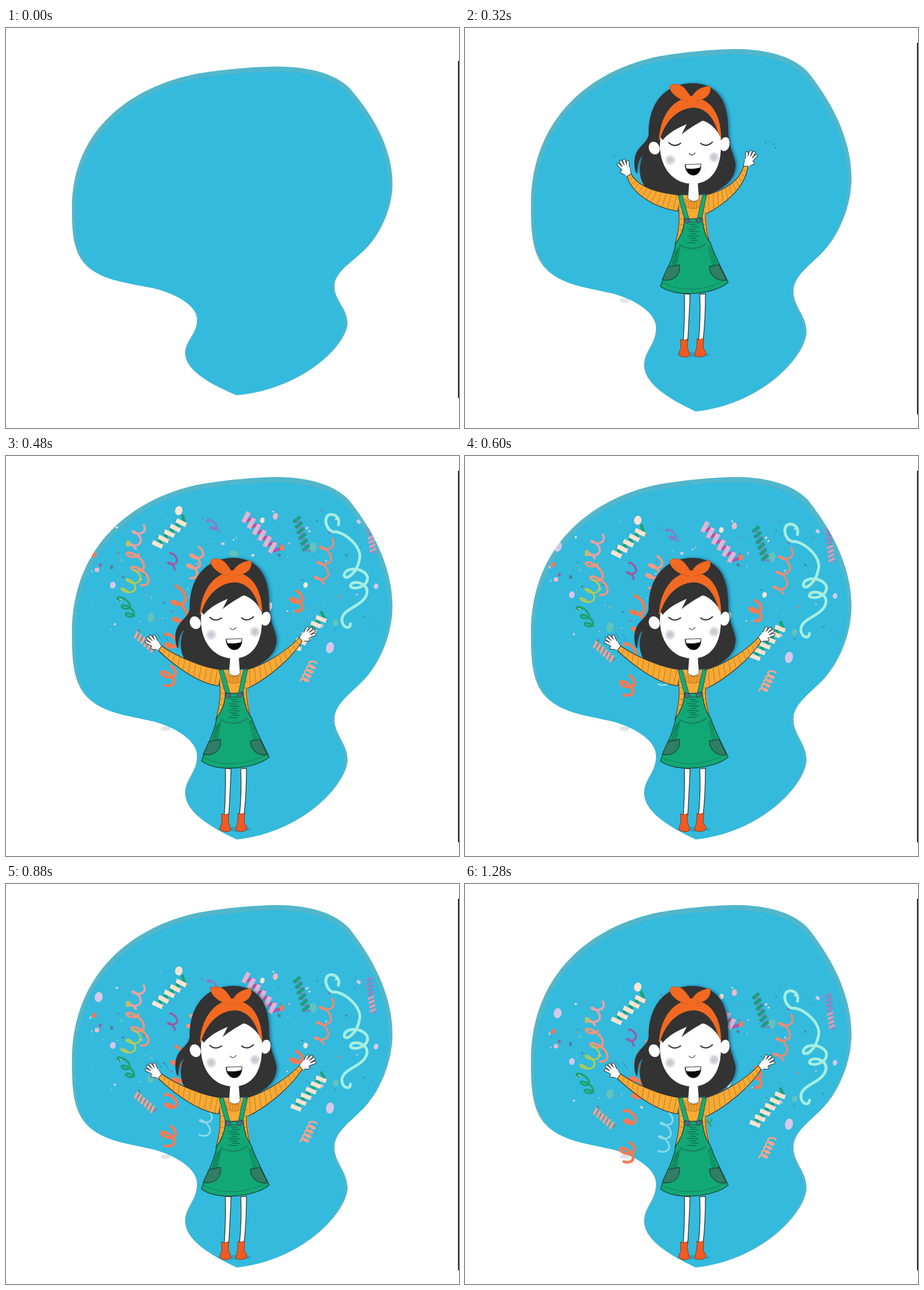
Animation of 797x703 px, one loop 1.36 s. Source, as an HTML page with a canvas:

```html
<!DOCTYPE html>
<html lang="en">
<head>
<meta charset="utf-8">
<title>Celebration</title>
<style>
  html, body { margin: 0; width: 100%; height: 100%; overflow: hidden; background: #fff; }
  canvas { display: block; }
</style>
</head>
<body>
<canvas id="stage" width="797" height="703"></canvas>
<script>
const ctx = document.getElementById('stage').getContext('2d');
const LOOP = 1360, STEP = 40, TAU = Math.PI * 2;
const INK = '#2b2b2b', ORANGE = '#f47b55', CREAM = '#fbe3d3', GREEN = '#1fa06f',
      LILAC = '#d6c8ea', TEAL = '#62c3bd', MINT = '#a5eee0', PINK = '#efb9c8';

const clamp01 = v => Math.max(0, Math.min(1, v));
const mix = (a, b, k) => a + (b - a) * k;

function shape(d, fill, stroke, width = 1) {
  const path = new Path2D(d);
  if (fill) { ctx.fillStyle = fill; ctx.fill(path); }
  if (stroke) { ctx.strokeStyle = stroke; ctx.lineWidth = width; ctx.stroke(path); }
}
function oval(x, y, rx, ry, fill, stroke, tilt = 0) {
  ctx.beginPath();
  ctx.ellipse(x, y, rx, ry, tilt, 0, TAU);
  ctx.fillStyle = fill;
  ctx.fill();
  if (stroke) { ctx.strokeStyle = stroke; ctx.lineWidth = 1; ctx.stroke(); }
}
function line(x1, y1, x2, y2, color, width = 1) {
  ctx.beginPath();
  ctx.moveTo(x1, y1);
  ctx.lineTo(x2, y2);
  ctx.strokeStyle = color;
  ctx.lineWidth = width;
  ctx.stroke();
}

// ---- Backdrop ----
const blob = new Path2D(`M406 674 C350 648 315 622 315 592 C316 566 336 556 336 527
  C336 500 300 478 262 467 C215 456 170 452 142 423 C117 396 116 355 116 310
  C117 155 225 75 335 51 C385 42 440 37 480 37 C540 38 580 53 603 77
  C640 123 680 190 680 264 C680 310 660 360 633 390 C607 418 578 435 578 463
  C578 490 601 505 601 535 C598 580 520 662 406 674Z`);

// Confetti may leave the blob only at its lower side.
const confettiArea = new Path2D(blob);
confettiArea.rect(0, 400, 797, 303);

function backdrop(t) {
  const grow = mix(0.907, 1, clamp01(t / 120));
  ctx.save();
  ctx.translate(0, 352.5 + (1 - grow) * 16);
  ctx.scale(1, grow);
  ctx.translate(0, -352.5);
  ctx.fillStyle = '#000';
  ctx.fillRect(795.4, 26, 1.6, 653);
  if (t >= 120) oval(281, 479, 9, 4, '#dfe5e7');
  ctx.fillStyle = '#52b6ca';
  ctx.fill(blob);
  ctx.clip(blob);
  ctx.translate(400, 640);
  ctx.scale(0.978, 0.985);
  ctx.translate(-400, -640);
  ctx.fillStyle = '#33badd';
  ctx.fill(blob);
  ctx.restore();
}

// ---- Confetti ----
function curl(x1, y1, x2, y2, loops, r, color, width = 4, phase = 0) {
  ctx.beginPath();
  for (let i = 0; i <= 100; i++) {
    const s = i / 100, a = phase + s * loops * TAU;
    ctx.lineTo(mix(x1, x2, s) + r * Math.cos(a), mix(y1, y2, s) + r * 0.7 * Math.sin(a + 0.5));
  }
  ctx.strokeStyle = color;
  ctx.lineWidth = width;
  ctx.stroke();
}
function helix(x1, y1, x2, y2, turns, size, front, back) {
  const length = Math.hypot(x2 - x1, y2 - y1), pitch = length / turns;
  ctx.save();
  ctx.translate(x1, y1);
  ctx.rotate(Math.atan2(y2 - y1, x2 - x1));
  ctx.lineCap = 'butt';
  for (let i = 0; i < turns; i++) {
    const x = i * pitch;
    line(x + pitch * 0.4, size / 2, x + pitch, -size / 2, back, pitch * 0.4);
    line(x, -size / 2, x + pitch * 0.5, size / 2, front, pitch * 0.55);
  }
  ctx.restore();
}

let seed = 11;
const random = () => (seed = seed * 16807 % 2147483647) / 2147483647;
const speckColors = [ORANGE, LILAC, CREAM, TEAL, '#2c8fb2', '#a95a9f', PINK, '#507f9b'];
const specks = Array.from({ length: 120 }, (_, i) => ({
  x: 142 + random() * 518, y: 180 + random() * 215,
  size: 1.2 + random() * random() * 4.5, tilt: random() * 3,
  color: speckColors[i % speckColors.length]
}));
const dots = [
  [304, 181, 6.5, 8, CREAM], [163, 227, 7, 9, LILAC], [188, 312, 5, 6, LILAC],
  [255, 369, 6, 9, TEAL], [570, 422, 7, 10, LILAC], [580, 378, 5, 6, TEAL],
  [651, 314, 4, 5, LILAC], [540, 246, 6.5, 9, TEAL], [474, 191, 4.5, 6, PINK],
  [451, 198, 4, 5, CREAM], [527, 312, 4, 5, CREAM], [464, 350, 4, 8, '#fff'],
  [401, 257, 8, 6, TEAL], [160, 285, 4, 4, PINK]
];

function confetti(t) {
  ctx.save();
  ctx.clip(confettiArea);
  ctx.globalAlpha = clamp01((t - 360) / 80);
  ctx.translate(0, Math.min(0, (t - 1079) * 0.142));
  ctx.lineCap = ctx.lineJoin = 'round';
  for (const s of specks) {
    ctx.save();
    ctx.translate(s.x, s.y);
    ctx.rotate(s.tilt);
    ctx.fillStyle = s.color;
    ctx.fillRect(-s.size / 2, -s.size / 2, s.size, s.size * 1.3);
    ctx.restore();
  }
  for (const [x, y, rx, ry, color] of dots) oval(x, y, rx, ry, color, null, 0.2);

  helix(264, 243, 316, 195, 5, 18, CREAM, GREEN);
  helix(508, 424, 561, 364, 6, 18, CREAM, GREEN);
  helix(420, 190, 476, 254, 6, 19, '#e3b3d3', '#a958a8');
  helix(511, 194, 530, 254, 6, 14, '#249b80', '#6b8bc6');
  helix(639, 193, 642, 226, 4, 11, '#8f8ac6', '#5c92c0');
  helix(642, 226, 646, 256, 4, 11, '#d6a0b4', '#8f8ac6');
  helix(228, 398, 262, 428, 6, 13, '#f4a48e', '#6f90a5');
  curl(524, 482, 541, 448, 4.5, 6, '#f7a58b', 3, 3);

  curl(236, 208, 222, 250, 2, 9, '#e6a3a5', 4, 5.5);
  curl(222, 250, 240, 305, 2.2, 13, '#f1947c', 4, 0.5);
  curl(230, 292, 210, 328, 2.2, 10, '#b5cb51', 3, 4);
  curl(204, 335, 222, 370, 2.5, 9, GREEN, 3.5, 2);
  curl(296, 258, 290, 283, 1.5, 7, '#9e58a2', 3.5, 3);
  curl(360, 198, 369, 218, 1.6, 7, '#8a78c4', 3, 2);
  curl(338, 250, 325, 294, 2.5, 10, '#f49a82', 4, 4.8);
  curl(302, 322, 308, 382, 2, 13, ORANGE, 5, 4.5);
  curl(290, 402, 291, 424, 1.3, 10, ORANGE, 5, 3);
  curl(287, 460, 283, 482, 1.5, 12, ORANGE, 5, 5);
  curl(566, 232, 552, 312, 3, 11, '#ee8b72', 3.5, 5.5);
  curl(511, 328, 511, 352, 1.5, 10, ORANGE, 5, 4.7);
  curl(356, 407, 348, 468, 2.6, 10, '#8fd8e8', 3, 5);
  curl(428, 412, 426, 424, 1, 6, '#2aa782', 3);
  shape(`M585 206 C588 192 577 185 567 189 C556 198 568 222 580 218
    C600 222 626 245 622 266 C618 292 596 306 595 294 C598 278 632 282 636 298
    C638 314 612 322 606 314 C606 302 638 306 635 326 C630 350 590 352 591 374
    C592 388 606 390 606 380`, null, MINT, 5);
  ctx.fillStyle = ORANGE;
  ctx.fillRect(482, 241, 7, 10);
  ctx.fillRect(152, 255, 7, 8);
  ctx.fillStyle = '#c4bd61';
  ctx.fillRect(211, 234, 7, 10);
  ctx.restore();
}

// ---- Girl ----
// Each arm: upper edge from shoulder to wrist, then lower edge back to the body.
const arms = [
  { closed: [380, 376, 345, 372, 307, 365, 292, 338, 285, 343, 295, 375, 335, 398, 374, 404],
    open: [380, 376, 345, 372, 300, 352, 274, 334, 268, 342, 300, 372, 340, 400, 374, 404],
    angles: [-2.05, -2.4], side: 1 },
  { closed: [422, 376, 455, 368, 482, 352, 490, 325, 498, 325, 492, 365, 455, 393, 422, 410],
    open: [422, 376, 452, 369, 495, 342, 516, 319, 521, 326, 500, 358, 460, 392, 422, 410],
    angles: [-1.1, -0.65], side: -1 }
];
const bezier = (p, i, s) => [0, 1].map(n => {
  const q = 1 - s, at = j => p[i + j * 2 + n];
  return q * q * q * at(0) + 3 * q * q * s * at(1) + 3 * q * s * s * at(2) + s * s * s * at(3);
});

function hand(x, y, angle, side) {
  ctx.save();
  ctx.translate(x, y);
  ctx.rotate(angle);
  ctx.scale(1, side);
  ctx.lineCap = 'round';
  const fingers = [[6, 11, -9], [15, 25, -8], [16, 28, -2], [16, 27, 4], [14, 22, 9]];
  for (const [color, width] of [[INK, 5.4], ['#fff', 3.4]]) {
    for (const [from, to, dy] of fingers) line(from, dy * 0.6, to, dy, color, width);
  }
  shape('M-1 -4 L8 -7 Q19 -8 19 0 Q18 7 9 7 L-1 4Z', '#fff');
  line(-1, 4, 9, 7, INK, 0.8);
  ctx.restore();
}

function drawArm({ closed, open, angles, side }, k) {
  const p = closed.map((v, i) => mix(v, open[i], k));
  hand((p[6] + p[8]) / 2, (p[7] + p[9]) / 2, mix(...angles, k), side);
  shape(`M${p.slice(0, 2)} C${p.slice(2, 8)} L${p.slice(8, 10)} C${p.slice(10)}Z`, '#f8aa34', INK, 1.1);
  for (let s = 0.07; s < 0.98; s += 0.085) {
    line(...bezier(p, 0, s), ...bezier(p, 8, 1 - s), '#b9782a', 1);
  }
}

function cheek(x, y) {
  const glow = ctx.createRadialGradient(x, y, 1, x, y, 12);
  glow.addColorStop(0, '#c3c4cc');
  glow.addColorStop(0.5, '#d9dadf');
  glow.addColorStop(1, '#ffffff00');
  oval(x, y, 12, 12, glow);
}

function head() {
  ctx.save();
  ctx.shadowColor = 'rgba(15,75,110,.6)';
  ctx.shadowBlur = 5;
  ctx.shadowOffsetX = 3;
  shape(`M400 179 C350 180 322 215 323 270 C318 290 297 290 298 322 C299 333 301 337 303 338
    C303 322 306 312 313 306 C302 330 308 362 330 371 C360 376 400 376 430 374
    C460 362 477 345 476 320 C472 300 463 290 463 260 C463 215 448 180 400 179Z`, '#333');
  ctx.restore();
  oval(333, 293, 10, 12, '#fff', INK, -0.4);
  oval(457, 286, 9, 13, '#fff', INK, 0.2);
  shape(`M344 274 C338 318 360 356 402 356 C440 354 453 320 450 275
    C445 262 430 247 418 245 C405 252 395 258 381 269 L390 251 C374 258 358 266 348 279Z`, '#fff');
  shape(`M341 278 C345 225 375 203 400 204 C430 205 450 230 451 276 L446 268
    C438 238 422 222 402 222 C375 223 352 245 343 278Z`, '#f26a21');
  shape('M398 212 C380 211 362 198 360 186 C363 177 380 180 387 189 C393 196 398 203 398 212Z', '#f26a21', '#cf5518');
  shape('M397 211 C400 195 412 186 431 184 C434 198 424 210 397 211Z', '#f26a21', '#cf5518');
  oval(398, 207, 8, 6, '#f26a21');
  cheek(361, 314);
  cheek(438, 309);
  shape('M358 283 Q368 293 380 284 M414 284 Q424 293 436 282', null, INK, 2);
  shape('M394 302 Q399 309 405 301', null, INK, 1.2);
  shape('M387 322 L415 321 C417 347 388 347 387 322Z', '#050505', INK);
  shape('M388 322 L415 321 Q415 327 412 328 Q400 331 389 329Z', '#fff', INK, 0.7);
}

function outfit() {
  shape('M376 376 C378 410 376 440 369 464 L432 464 C424 430 424 405 424 376Z', '#f8aa34');
  shape('M376 400 C378 420 376 440 369 464 M432 464 C424 440 423 420 423 408', null, INK);
  for (let y = 396; y < 460; y += 10) {
    line(375, y, 386, y + 3, '#b9782a');
    line(416, y + 3, 425, y, '#b9782a');
  }
  shape('M383 380 Q402 396 421 380 L420 392 Q402 407 385 393Z', '#f39c2b', '#b9782a');
  for (let x = 388; x < 420; x += 5) line(x, 387, x + (x - 402) * -0.1, 398, '#b9782a', 0.8);
  shape('M394 354 L410 354 L412 382 Q403 391 392 382Z', '#fff');
  shape('M394 355 L392 382 Q403 391 412 382 L410 355', null, INK, 0.8);
  shape('M375 377 L382 375 L394 417 L387 421Z M418 376 L425 376 L416 420 L409 416Z', '#17aa72', '#205f47');
  shape(`M386 416 Q401 419 417 415 C420 440 425 452 432 460 C440 485 452 505 463 529
    C440 550 370 557 344 536 C352 510 366 490 371 460 C382 445 386 430 386 416Z`, '#12a875', '#1c4638', 1.4);
  for (let i = 0; i < 10; i++) {
    const y = 423 + i * 4;
    line(391 + i % 3 * 3, y, 411 - i % 2 * 4, y + 1, '#126e50', 1.3);
    line(370 - i, 464 + y / 40 + i * 3, 379 - i * 0.6, 466 + i * 3.4, '#126e50', 1.2);
    line(434 + i, 464 + i * 3.5, 427 + i * 0.8, 468 + i * 3.4, '#126e50', 1.2);
  }
  shape('M377 463 Q402 477 425 461', null, '#168b62', 3);
  shape('M357 502 L377 498 C381 516 365 529 347 524Z M430 501 C430 516 443 528 460 525 L447 498Z', '#2f7e65', '#1c4638', 1.3);
  shape('M347 530 Q400 554 459 525', null, '#117e58', 1);
  oval(391, 421, 4.5, 4.5, '#4b6d80', '#26495a');
  oval(411, 420, 4.5, 4.5, '#4b6d80', '#26495a');
}

function legs() {
  oval(402, 656, 30, 4, '#2aa2c4');
  shape('M386 549 L396 550 Q394 595 392 631 L384 631 Q387 590 386 549Z', '#fff', INK, 1.2);
  shape('M413 550 L423 549 Q423 595 419 630 L411 630 Q415 590 413 550Z', '#fff', INK, 1.2);
  shape('M379 629 Q386 632 392 628 C390 640 392 648 396 656 Q390 664 378 658 Q375 652 380 645Z', '#f35a22', '#873915');
  shape('M408 628 Q414 631 420 627 L419 645 C424 650 426 656 421 658 Q413 662 404 658 C405 650 409 645 408 628Z', '#f35a22', '#873915');
}

function girl(t) {
  if (t < 200) return;
  const k = clamp01((t - 320) / 160);
  ctx.save();
  ctx.translate(0, Math.min(0, (t - 480) * 0.512));
  legs();
  head();
  arms.forEach(arm => drawArm(arm, k));
  outfit();
  if (k === 1) {
    line(264, 309, 273, 323, '#287f9c', 0.8);
    line(277, 313, 286, 326, '#287f9c', 0.8);
  } else {
    for (const [x, y] of [[263, 308], [529, 284], [537, 282], [543, 286], [546, 292]]) oval(x, y, 1, 1, '#24718c');
  }
  ctx.restore();
}

function frame(now) {
  const time = now % LOOP;
  const t = time < 80 ? 0 : Math.min(1280, Math.floor(time / STEP) * STEP);
  ctx.fillStyle = '#fff';
  ctx.fillRect(0, 0, 797, 703);
  backdrop(t);
  if (t > 360) confetti(t);
  girl(t);
  requestAnimationFrame(frame);
}
frame(performance.now());
</script>
</body>
</html>
```
